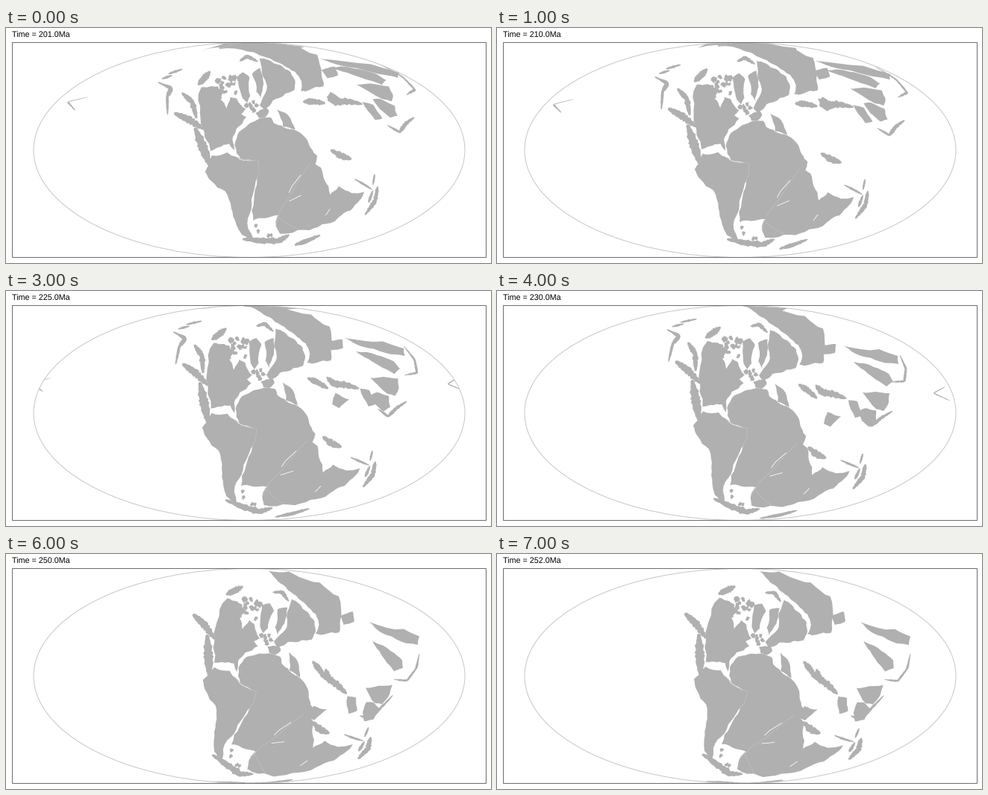
Write a matplotlib script that moves like this. It is 650x315 px and loops after 8 s.

```python
import numpy as np
import matplotlib.pyplot as plt
from matplotlib.animation import FuncAnimation
from matplotlib.collections import LineCollection, PolyCollection
from matplotlib.patches import Ellipse, Rectangle

W, H, DPI = 650, 315, 100
CX, CY, RX, RY = 326, 163.5, 289, 144
PX = 72 / DPI
LAND, SEAM = "#b0b0b0", "#bfbfbf"
TIMES = [201, 210, 220, 225, 230, 240, 250, 252]
OLDEST, YOUNGEST = TIMES[-1], TIMES[0]
rng = np.random.default_rng(7)

# Mollweide projection: auxiliary angle against latitude
THETA = np.linspace(-np.pi / 2, np.pi / 2, 4001)
LAT = np.arcsin(np.clip((2 * THETA + np.sin(2 * THETA)) / np.pi, -1, 1))


def pts(flat):
    return np.array(flat, float).reshape(-1, 2)


def to_sphere(p):
    th = np.arcsin(np.clip((CY - p[:, 1]) / RY, -0.999, 0.999))
    lat = np.interp(th, THETA, LAT)
    lon = np.clip(np.pi * (p[:, 0] - CX) / RX / np.cos(th), -np.pi, np.pi)
    return np.column_stack([np.cos(lat) * np.cos(lon),
                            np.cos(lat) * np.sin(lon), np.sin(lat)])


def to_map(v, closed=True):
    """Project an outline; repeat it where it crosses the edge of the map."""
    if closed:
        v = np.vstack([v, v[:1]])
    lon = np.unwrap(np.arctan2(v[:, 1], v[:, 0]))
    lat = np.arcsin(np.clip(v[:, 2], -1, 1))
    if closed and abs(lon[-1] - lon[0]) > np.pi:  # encloses a pole
        rise = np.linspace(lat[-1], np.sign(lat.mean()) * np.pi / 2, 20)
        lon = np.r_[lon, np.full(20, lon[-1]), np.full(20, lon[0])]
        lat = np.r_[lat, rise, rise[::-1]]
    th = np.interp(lat, LAT, THETA)
    copies = []
    for turn in (-2, -1, 0, 1, 2):
        x = lon + 2 * np.pi * turn
        if x.max() > -np.pi and x.min() < np.pi:
            copies.append(np.column_stack([CX + RX * x / np.pi * np.cos(th),
                                           CY - RY * np.sin(th)]))
    return copies


def spin(a, b):
    """Axis and angle of the rotation that best carries points a onto b."""
    u, _, vt = np.linalg.svd(to_sphere(pts(a)).T @ to_sphere(pts(b)))
    r = vt.T @ np.diag([1, 1, np.sign(np.linalg.det(vt.T @ u.T))]) @ u.T
    axis = np.array([r[2, 1] - r[1, 2], r[0, 2] - r[2, 0], r[1, 0] - r[0, 1]])
    angle = np.arccos(np.clip((np.trace(r) - 1) / 2, -1, 1))
    return axis / max(np.linalg.norm(axis), 1e-9), angle


def rotate(v, axis, angle):
    c, s = np.cos(angle), np.sin(angle)
    return v * c + np.cross(axis, v) * s + np.outer(v @ axis, axis) * (1 - c)


class Motion:
    """Rigid drift on the sphere, from a base age to both ends of the loop."""

    def __init__(self, age, base, young, old, power=1, gone=999):
        self.age, self.power, self.gone = age, power, gone
        self.young, self.old = spin(base, young), spin(base, old)

    def move(self, v, t):
        (axis, angle), end = ((self.young, YOUNGEST) if t < self.age
                              else (self.old, OLDEST))
        u = (t - self.age) / (end - self.age)
        return rotate(v, axis, angle * (1 - (1 - u) ** self.power))


def roughen(p, amount=0.1, levels=2):
    """Ragged coast by midpoint displacement."""
    for _ in range(levels):
        d = np.roll(p, -1, axis=0) - p
        k = rng.uniform(-amount, amount, (len(p), 1))
        mid = p + d / 2 + k * np.column_stack([-d[:, 1], d[:, 0]])
        p = np.stack([p, mid], axis=1).reshape(-1, 2)
    return p


def ribbon(line, width):
    """Tapering band along a centre line."""
    s = np.linspace(0, 1, 24)
    k = np.linspace(0, 1, len(line))
    p = np.column_stack([np.interp(s, k, line[:, 0]), np.interp(s, k, line[:, 1])])
    d = np.gradient(p, axis=0)
    n = np.column_stack([-d[:, 1], d[:, 0]]) / np.linalg.norm(d, axis=1)[:, None]
    half = width / 2 * np.sqrt(np.sin(np.pi * s) + 0.05)
    half = (half * rng.uniform(0.75, 1.25, 24))[:, None]
    return np.vstack([p + n * half, (p - n * half)[::-1]])


shapes, seams = [], []


def add(motion, outline):
    shapes.append((motion, to_sphere(outline)))


def block(flat, young, old, width=0, gone=999):
    """Small plate at 230 Ma; its two ends lie at `young` and `old` later."""
    p = pts(flat)
    ends = p[[0, -1 if width else len(p) // 2]]
    outline = ribbon(p, width) if width else roughen(p, 0.06)
    add(Motion(230, ends, young, old, power=2, gone=gone), outline)


SUPER = ([270, 74, 274, 165, 299, 277, 414, 190, 475, 234, 350, 125, 437, 268],
         [257, 78, 271, 172, 317, 274, 417, 176, 479, 217, 345, 115, 455, 252],
         [285, 62, 276, 150, 277, 265, 411, 208, 468, 264, 357, 120, 418, 287])
pangaea = Motion(220, *SUPER)
alaska = Motion(220, *SUPER, gone=250)
siberia = Motion(240, [444, 68, 385, 55, 440, 103],
                 [428, 45, 358, 45, 421, 78], [448, 72, 391, 57, 449, 103])


def land(*flat, motion=pangaea):
    add(motion, roughen(pts(flat)))


def strip(width, *flat, motion=pangaea):
    add(motion, ribbon(pts(flat), width))


def islands(n, x0, x1, y0, y1, size):
    a = np.arange(8) * np.pi / 4
    for x, y in rng.uniform([x0, y0], [x1, y1], (n, 2)):
        r = rng.uniform(0.4, 1, 8) * size
        land(*np.column_stack([x + r * np.cos(a), y + r * np.sin(a)]).ravel())


# Siberia and Kazakhstan
land(350, 22, 386, 24, 420, 38, 443, 56, 442, 88, 440, 103, 420, 105, 408, 104,
     413, 92, 409, 78, 396, 65, 384, 54, 370, 42, 358, 32, motion=siberia)
# North America
land(270, 80, 275, 72, 289, 73, 303, 82, 297, 94, 303, 107, 310, 93, 318, 97,
     328, 113, 321, 119, 327, 124, 312, 137, 305, 150, 306, 165, 300, 155,
     285, 157, 274, 160, 269, 140, 267, 115)
strip(9, 234, 101, 252, 113, 269, 129)
strip(11, 258, 125, 264, 150, 271, 180)
strip(7, 249, 75, 260, 90, 262, 113, motion=alaska)
strip(5, 221, 58, 237, 67, 229, 78, 225, 102, motion=alaska)
strip(3, 237, 48, 258, 43, motion=alaska)
strip(3, 227, 54, 242, 50, motion=alaska)
# Arctic and Europe
strip(9, 272, 68, 282, 60, 291, 52)
land(322, 68, 332, 63, 339, 72, 336, 97, 331, 105, 325, 95)
land(343, 68, 355, 62, 356, 84, 350, 103, 345, 93)
strip(5, 331, 47, 342, 43, 354, 53)
islands(24, 294, 321, 64, 90, 4.2)
islands(9, 328, 345, 100, 119, 3.8)
land(357, 49, 368, 53, 382, 62, 394, 73, 398, 85, 395, 98, 383, 101, 365, 108,
     353, 119, 347, 112, 359, 92, 357, 75)
land(340, 121, 355, 116, 358, 122, 352, 129, 343, 128)
land(369, 121, 383, 131, 390, 151, 374, 145)
# Africa
land(331, 133, 359, 130, 363, 139, 372, 143, 378, 148, 388, 151, 397, 157,
     404, 166, 408, 178, 415, 189, 412, 198, 405, 206, 395, 225, 375, 245,
     354, 262, 333, 262, 318, 262, 323, 236, 331, 210, 334, 185, 313, 179,
     307, 159, 315, 142)
# South America
land(275, 166, 296, 166, 308, 175, 320, 182, 336, 184, 335, 200, 329, 211,
     320, 234, 311, 258, 309, 270, 313, 285, 299, 277, 294, 262, 291, 240,
     286, 216, 270, 200, 263, 186)
# Antarctica, India and Australia
land(404, 197, 418, 204, 421, 220, 427, 240, 440, 229, 458, 237, 476, 234,
     470, 244, 456, 258, 437, 268, 412, 277, 385, 284, 350, 286, 347, 275,
     356, 255, 374, 236, 390, 214)
strip(8, 298, 282, 322, 290, 345, 295, 362, 289)
strip(5, 368, 301, 390, 296, 411, 289)
strip(6, 496, 225, 493, 243, 480, 260)
strip(4, 489, 231, 483, 246)
strip(3, 492, 210, 489, 224)
strip(3, 463, 219, 488, 230)
islands(4, 314, 342, 268, 286, 3.5)

# Sutures and narrow rifts
for colour, flat in [
        (SEAM, [308, 175, 320, 182, 336, 184, 335, 200, 329, 211]),
        (SEAM, [404, 198, 390, 214, 374, 236, 356, 255, 347, 275]),
        (SEAM, [350, 263, 362, 274, 378, 284]),
        ("white", [390, 212, 376, 226, 371, 234]),
        ("white", [370, 245, 387, 239]),
        ("white", [425, 258, 418, 266])]:
    seams.append((colour, to_sphere(pts(flat))))

# East Asian blocks
block([434, 74, 454, 71, 453, 83, 437, 85], [424, 57, 444, 63], [448, 83, 467, 91])
block([465, 74, 512, 78, 537, 87, 538, 98, 515, 95, 485, 86],
      [430, 42, 513, 62], [489, 92, 550, 121])
block([478, 95, 505, 102, 525, 111, 531, 121, 522, 128, 508, 119, 492, 106],
      [432, 53, 515, 72], [490, 116, 533, 154])
block([490, 136, 507, 135, 526, 137, 525, 149, 518, 161, 508, 158],
      [471, 76, 517, 88], [483, 180, 513, 188])
block([471, 146, 483, 148, 490, 166, 480, 170], [482, 102, 501, 118],
      [457, 190, 471, 211])
block([494, 157, 508, 160, 509, 175, 499, 182, 489, 174, 485, 161],
      [503, 97, 514, 118], [491, 203, 482, 221])
# Cimmerian ribbons
block([404, 125, 416, 133, 429, 144], [397, 99, 429, 101],
      [411, 144, 429, 169], width=8)
block([427, 126, 436, 136, 450, 138, 468, 144], [430, 92, 478, 102],
      [430, 156, 455, 186], width=9)
block([443, 162, 461, 168, 447, 182, 438, 178], [436, 88, 441, 102],
      [412, 206, 413, 221])
block([417, 209, 428, 219, 441, 224], [434, 163, 464, 176],
      [412, 226, 432, 240], width=9)
# Island arcs and the far ocean fragment
block([540, 86, 548, 104, 546, 121, 528, 122], [513, 60, 526, 74],
      [552, 136, 522, 166], width=3)
block([490, 170, 502, 181, 515, 170, 530, 161], [512, 130, 546, 120],
      [478, 215, 515, 192], width=4)
block([601, 128, 585, 137, 607, 147], [110, 93, 93, 110],
      [597, 169, 593, 187], width=1.5, gone=250)

plt.rcParams["text.hinting"] = "none"
fig = plt.figure(figsize=(W / DPI, H / DPI), dpi=DPI, facecolor="white")
ax = fig.add_axes([0, 0, 1, 1])
ax.set(xlim=(0, W), ylim=(H, 0))
ax.axis("off")
globe = Ellipse((CX, CY), 2 * RX, 2 * RY, fill=False, ec="#c8c8c8", lw=PX, zorder=5)
ax.add_patch(globe)
ax.add_patch(Rectangle((8.5, 19.5), 635, 288, fill=False, ec="#6e6e6e", lw=PX,
                       snap=False, zorder=6))
title = ax.text(8, 13.3, "", family="Liberation Sans", size=10.8 * PX, color="black")

plates = PolyCollection([], facecolors=LAND, edgecolors="none", zorder=2)
joints = LineCollection([], linewidths=0.8 * PX, zorder=3)
for layer in (plates, joints):
    ax.add_collection(layer, autolim=False)
    layer.set_clip_path(globe)


def draw(i):
    t = TIMES[i]
    plates.set_verts([p for m, v in shapes if t < m.gone
                      for p in to_map(m.move(v, t))])
    parts = [(c, p) for c, v in seams
             for p in to_map(pangaea.move(v, t), closed=False)]
    joints.set_segments([p for _, p in parts])
    joints.set_color([c for c, _ in parts])
    title.set_text(f"Time = {t:.1f}Ma")
    return plates, joints, title


anim = FuncAnimation(fig, draw, frames=len(TIMES), interval=1000,
                     repeat=True, repeat_delay=0, blit=False)
plt.show()
```
